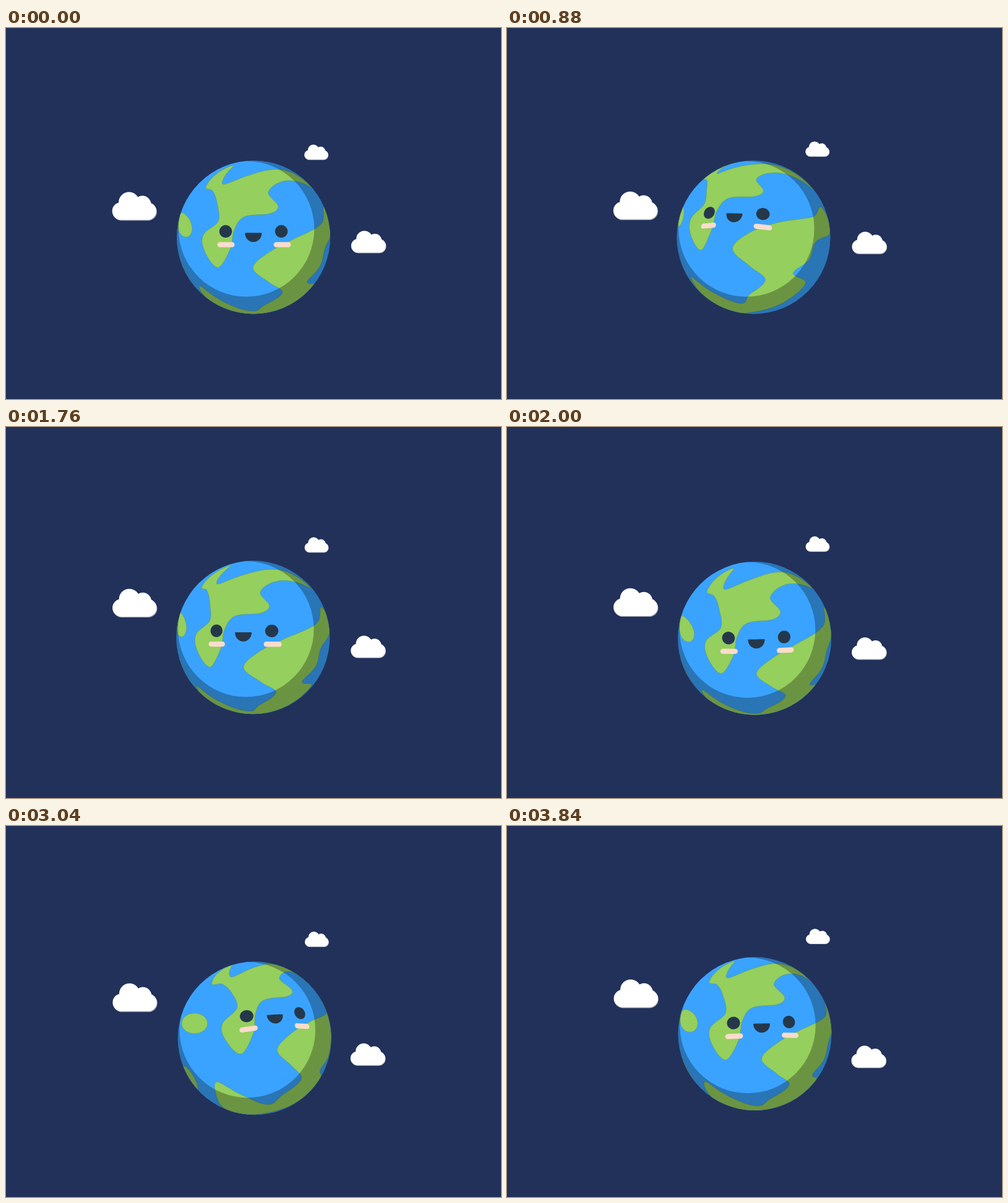
An HTML page with a canvas for the animation above (3920 ms loop, 800 px wide and 600 px high).

```html
<!DOCTYPE html>
<html lang="en">
<head>
<meta charset="utf-8">
<title>Happy planet</title>
<style>
  html, body { margin: 0; width: 100%; height: 100%; overflow: hidden; background: #22315a; }
  canvas { display: block; }
</style>
</head>
<body>
<canvas id="stage" width="800" height="600"></canvas>
<script>
const ctx = document.getElementById('stage').getContext('2d');
const LOOP = 3920, STEP = 80, R = 124, TAU = Math.PI * 2;

// Head poses: angles are yaw, pitch and roll in degrees; centre is in pixels.
const FRONT = { angles: [0, 0, 0], centre: [400, 338] };
const LEFT = { angles: [-15.5, 14.5, 1.3], centre: [399, 339] };
const RIGHT = { angles: [17.2, 13.7, -3.3], centre: [402, 344] };

const spin = (a, b, deg) => {
  const c = Math.cos(deg * TAU / 360), s = Math.sin(deg * TAU / 360);
  return [a * c - b * s, a * s + b * c];
};

function rotate([x, y, z], [yaw, pitch, roll]) {
  [y, z] = spin(y, z, pitch);
  [z, x] = spin(z, x, yaw);
  [x, y] = spin(x, y, roll);
  return [x, y, z];
}

function unrotate([x, y, z], [yaw, pitch, roll]) {
  [x, y] = spin(x, y, -roll);
  [z, x] = spin(z, x, -yaw);
  [y, z] = spin(y, z, -pitch);
  return [x, y, z];
}

// Lifts a pixel seen in a pose onto the unit sphere.
function lift({ angles, centre }, px, py) {
  const x = (px - centre[0]) / R, y = (py - centre[1]) / R;
  const d = Math.max(1, Math.hypot(x, y));
  const z = Math.sqrt(Math.max(0, 1 - (x * x + y * y) / (d * d)));
  return unrotate([x / d, y / d, z], angles);
}

const keyPoints = (pose, text) => text.split(' ').map(pair => lift(pose, ...pair.split(',').map(Number)));

const outline = (pose, fn) =>
  Array.from({ length: 40 }, (_, i) => lift(pose, ...fn(Math.cos(i / 40 * TAU), Math.sin(i / 40 * TAU))));

// Closed Catmull-Rom curve through points on the sphere.
function smooth(points) {
  const out = [], n = points.length;
  for (let i = 0; i < n; i++) {
    const [a, b, c, d] = [-1, 0, 1, 2].map(k => points[(i + k + n) % n]);
    for (let u = 0; u < 1; u += 0.1) {
      const p = b.map((v, k) => v + u / 2 * (c[k] - a[k]
        + u * (2 * a[k] - 5 * v + 4 * c[k] - d[k] + u * (3 * (v - c[k]) + d[k] - a[k]))));
      const len = Math.hypot(...p);
      out.push(p.map(v => v / len));
    }
  }
  return out;
}

const west = keyPoints(FRONT,
  '323,257 341,235 368,222 350,252 395,237 455,231 495,259 450,247 424,265 440,288 ' +
  '426,300 385,305 369,326 362,358 342,387 320,358 319,334 343,312 341,282 334,263');
const south = [
  ...keyPoints(LEFT,
    '299,403 335,429 380,446 392,432 418,408 392,385 365,358 390,333 435,316 ' +
    '495,306 508,290 523,328 501,345 489,375 463,397 483,413 450,443 398,460'),
  ...keyPoints(RIGHT, '365,463 340,436')
];
const island = outline(RIGHT, (c, s) => [305 + 21 * c, 320 + 16.5 * s]);
const sliver = outline(RIGHT, (c, s) => [298 + 6 * c + 11 * s, 409 - 2 * c + 20 * s]);
const lands = [smooth(west), smooth(south), island, sliver];

const eye = x => outline(FRONT, (c, s) => [x + 10.2 * c, 328.5 + 10.2 * s]);
const blush = x => outline(FRONT, (c, s) => [x + Math.sign(c) * 9.7 + 4.2 * c, 350 + 4.2 * s]);
const mouth = outline(FRONT, (c, s) => [399.8 + 12.8 * c, 331.5 + Math.max(0, 13.5 * s)]);
const eyes = [eye(355), eye(445)];
const cheeks = [blush(355.5), blush(446.5)];

// Eased progress from 0 to 1 between two times.
const ramp = (t, from, to) => {
  const u = Math.min(1, Math.max(0, (t - from) / (to - from)));
  return u * u * (3 - 2 * u);
};
const mix = (a, b, u) => a.map((v, i) => v + (b[i] - v) * u);

// Look left, swing to the right through a dip, then return to the front.
function anglesAt(t) {
  const swing = ramp(t, 1330, 2640);
  let angles = mix(FRONT.angles, LEFT.angles, ramp(t, 0, 410));
  angles = mix(angles, RIGHT.angles, swing);
  angles = mix(angles, FRONT.angles, ramp(t, 3570, 4000));
  angles[1] -= 73 * swing * (1 - swing);
  return angles;
}

const globeY = t => 338.4 + 6 * ramp(t, 1200, 2700) - 9 * ramp(t, 2750, 4050);

const clouds = [
  { x: 207.5, dx: 1, scale: 1, y: t => 265.3 - 17.8 * (t / LOOP) ** 2 },
  { x: 501.5, dx: 1, scale: 0.54, y: t => 188.5 - 22.8 * t / LOOP },
  { x: 586, dx: -1.3, scale: 0.785, y: t => 328 + 27.3 * ramp(t, 400, 3840) }
];

function disc(x, y, r) {
  ctx.moveTo(x + r, y);
  ctx.arc(x, y, r, 0, TAU);
}

function puff(colour, x, y) {
  ctx.fillStyle = colour;
  ctx.beginPath();
  disc(x - 21.5, y + 30.8, 14.2);
  disc(x + 21.5, y + 30.8, 14.2);
  disc(x - 8.5, y + 16.7, 16.7);
  disc(x + 13.3, y + 19.5, 13.5);
  ctx.rect(x - 21.5, y + 20, 43, 25);
  ctx.fill();
}

function drawCloud({ x, dx, scale, y }, t) {
  ctx.save();
  ctx.translate(x + dx * t / LOOP, y(t));
  ctx.scale(scale, scale);
  puff('#a9aeb8', 0.6, 1.2);
  puff('#fff', -0.2, 0);
  ctx.restore();
}

function trace(points, angles) {
  ctx.beginPath();
  for (const p of points) {
    const [x, y, z] = rotate(p, angles);
    const k = z < 0 ? R / Math.hypot(x, y) : R;
    ctx.lineTo(x * k, y * k);
  }
  ctx.closePath();
}

function fillAll(shapes, angles, colour, edge) {
  ctx.fillStyle = colour;
  ctx.strokeStyle = edge;
  for (const shape of shapes) {
    trace(shape, angles);
    ctx.fill();
    if (edge) ctx.stroke();
  }
}

function drawGlobe(t) {
  const angles = anglesAt(t);
  ctx.save();
  ctx.translate(400 + angles[0] / 10, globeY(t));
  ctx.lineJoin = 'round';

  ctx.save();
  ctx.beginPath();
  disc(0, 0, R);
  ctx.fillStyle = '#3aa3ff';
  ctx.fill();
  ctx.clip();
  ctx.lineWidth = 0.9;
  fillAll(lands, angles, '#95cf5d', 'rgba(92, 150, 110, .65)');
  ctx.beginPath();
  disc(0, 0, R + 2);
  disc(-11.5, -13.5, 109.7);
  ctx.fillStyle = 'rgba(0, 0, 0, .285)';
  ctx.fill('evenodd');
  ctx.restore();

  ctx.lineWidth = 1.4;
  fillAll(eyes, angles, '#25384b');
  fillAll([mouth], angles, '#25384b', '#25384b');
  fillAll(cheeks, angles, '#fbdccb');
  ctx.restore();
}

function draw(now) {
  const t = Math.floor(now % LOOP / STEP) * STEP;
  ctx.fillStyle = '#22315a';
  ctx.fillRect(0, 0, 800, 600);
  drawGlobe(t);
  for (const cloud of clouds) drawCloud(cloud, t);
}

const start = performance.now();
function tick() {
  draw(performance.now() - start);
  requestAnimationFrame(tick);
}
tick();
</script>
</body>
</html>
```
